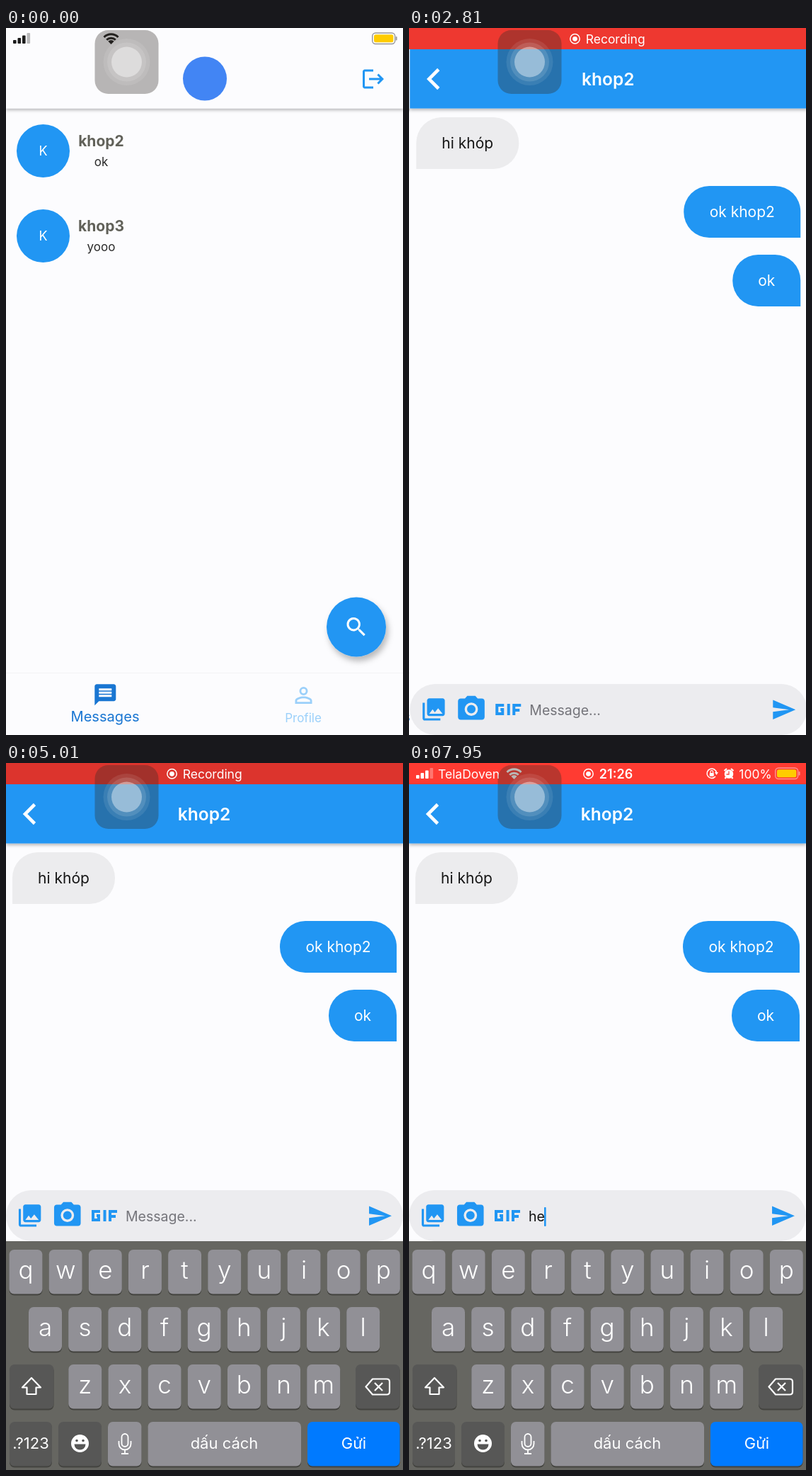
These frames come from a looping animation (561x998 px, 8 s). An HTML page:

```html
<!DOCTYPE html>
<html lang="vi">
<head>
<meta charset="utf-8">
<title>Chat</title>
<style>
html, body { margin: 0; width: 100%; height: 100%; overflow: hidden; background: #fcfcfe; }
svg { display: block; width: 100%; height: 100%; }
text { font-family: Inter, Roboto, sans-serif; white-space: pre; }
</style>
</head>
<body>
<svg id="stage" viewBox="0 0 561 998" xmlns="http://www.w3.org/2000/svg"></svg>
<script>
const LOOP = 8000;
const BLUE = '#2196f3', PAPER = '#fcfcfe';

const text = (str, x, y, size, fill, { weight = 400, anchor = 'middle', id = '' } = {}) =>
  `<text ${id && `id="${id}"`} x="${x}" y="${y + size * 0.36}" font-size="${size}" font-weight="${weight}" text-anchor="${anchor}" fill="${fill}">${str}</text>`;
const rect = (x, y, w, h, r, fill, extra = '') =>
  `<rect x="${x}" y="${y}" width="${w}" height="${h}" rx="${r}" fill="${fill}" ${extra}/>`;
const circle = (x, y, r, fill, extra = '') => `<circle cx="${x}" cy="${y}" r="${r}" fill="${fill}" ${extra}/>`;
const line = (d, color, width, extra = '') =>
  `<path d="${d}" fill="none" stroke="${color}" stroke-width="${width}" ${extra}/>`;
const icon = (d, x, y, scale, fill) =>
  `<path transform="translate(${x} ${y}) scale(${scale})" d="${d}" fill="${fill}" fill-rule="evenodd"/>`;
const group = (id, content, extra = '') => `<g id="${id}" ${extra}>${content}</g>`;

const ICONS = {
  logout: 'M17 7l-1.4 1.4L18.2 11H8v2h10.2l-2.6 2.6L17 17l5-5zM4 5h8V3H4c-1.1 0-2 .9-2 2v14c0 1.1.9 2 2 2h8v-2H4z',
  search: 'M15.5 14h-.8l-.3-.3A6.5 6.5 0 1 0 13.7 14.4l.3.3v.8l5 5 1.5-1.5zm-6 0a4.5 4.5 0 1 1 0-9 4.5 4.5 0 0 1 0 9z',
  message: 'M20 2H4c-1.1 0-2 .9-2 2v18l4-4h14c1.1 0 2-.9 2-2V4c0-1.1-.9-2-2-2zm-2 12H6v-2h12zm0-3H6V9h12zm0-3H6V6h12z',
  person: 'M12 5.9a2.1 2.1 0 1 1 0 4.2 2.1 2.1 0 0 1 0-4.2m0 9c3 0 6.1 1.5 6.1 2.1v1.1H5.9V17c0-.6 3.1-2.1 6.1-2.1M12 4a4 4 0 1 0 0 8 4 4 0 0 0 0-8m0 9c-2.7 0-8 1.3-8 4v3h16v-3c0-2.7-5.3-4-8-4z',
  photos: 'M22 16V4c0-1.1-.9-2-2-2H8c-1.1 0-2 .9-2 2v12c0 1.1.9 2 2 2h12c1.1 0 2-.9 2-2zm-11-4l2 2.7L16 11l4 5H8zM2 6v14c0 1.1.9 2 2 2h14v-2H4V6z',
  camera: 'M9 2L7.2 4H4c-1.1 0-2 .9-2 2v12c0 1.1.9 2 2 2h16c1.1 0 2-.9 2-2V6c0-1.1-.9-2-2-2h-3.2L15 2zm3 15a5 5 0 1 1 0-10 5 5 0 0 1 0 10zm0-1.8a3.2 3.2 0 1 0 0-6.4 3.2 3.2 0 0 0 0 6.4z',
  send: 'M2 21L23 12 2 3v7l15 2-15 2z'
};

function contact(y, name, last) {
  return circle(52.5, y, 37.5, BLUE) + text(name[0].toUpperCase(), 52.5, y, 18, '#fff') +
    text(name, 134.5, y - 14, 21, '#616159', { weight: 700 }) + text(last, 134.5, y + 15.5, 17, '#292929');
}

function appBar(fill) {
  return rect(0, 0, 561, 113.5, 0, fill, 'filter="url(#barShadow)"');
}

function homePage() {
  return rect(0, 0, 561, 998, 0, PAPER) + appBar(PAPER) +
    circle(281, 71.5, 31, '#4285f4') +
    icon(ICONS.logout, 501, 54, 1.5, BLUE) +
    contact(173.5, 'khop2', 'ok') + contact(293.5, 'khop3', 'yooo') +
    circle(495, 845.5, 42, BLUE, 'filter="url(#fabShadow)"') +
    icon(ICONS.search, 477, 827.5, 1.5, '#fff') +
    line('M0 910.5H561', '#f3f3f5', 1) +
    icon(ICONS.message, 122.3, 923.3, 1.5, '#1976d2') + text('Messages', 140, 972, 20.1, '#1976d2') +
    icon(ICONS.person, 402.5, 924, 1.5, '#9bd0fa') + text('Profile', 420, 974, 17, '#9bd0fa');
}

function bubble(y, width, str, mine) {
  const x = mine ? 552 - width : 9, right = x + width, bottom = y + 73;
  const corners = mine
    ? `H${right - 36}A36 36 0 0 1 ${right} ${y + 36}V${bottom}H${x + 36}A36 36 0 0 1 ${x} ${bottom - 36}V${y + 36}`
    : `H${right - 36}A36 36 0 0 1 ${right} ${y + 36}V${bottom - 36}A36 36 0 0 1 ${right - 36} ${bottom}H${x}V${y + 36}`;
  return `<path d="M${x + 36} ${y}${corners}A36 36 0 0 1 ${x + 36} ${y}Z" fill="${mine ? BLUE : '#ececee'}"/>` +
    text(str, x + width / 2, y + 36, 21, mine ? '#fff' : '#151515');
}

function inputBar() {
  return rect(0, 0, 561, 72, 36, '#ececef') +
    icon(ICONS.photos, 14.8, 17, 1.57, BLUE) + icon(ICONS.camera, 64.2, 13, 1.88, BLUE) +
    line('M133 30H123V42H131V36H128M139.5 28V44M147 44V30H157M147 37H155', BLUE, 4) +
    text('Message...', 169, 37, 19.5, '#74747a', { anchor: 'start', id: 'hint' }) +
    text('', 169, 37, 19.5, '#111', { anchor: 'start', id: 'typed' }) +
    rect(168, 24, 2.6, 27, 1, BLUE, 'id="caret"') +
    icon(ICONS.send, 510, 18, 1.52, BLUE);
}

function chatPage() {
  return rect(0, 0, 561, 998, 0, PAPER) + appBar(BLUE) +
    line('M40.5 58.5L27 72L40.5 85.5', '#fff', 4.6) +
    text('khop2', 280, 72, 24.5, '#fff', { weight: 600 }) +
    bubble(126, 145, 'hi khóp', false) + bubble(223, 165, 'ok khop2', true) + bubble(320, 96, 'ok', true) +
    group('input', inputBar());
}

function key(x, y, w, fill, content = '') {
  return rect(x, y + 1.6, w, 63, 7, '#43433f') + rect(x, y, w, 62.5, 7, fill) + content;
}

function keyboard() {
  const light = '#919096', dark = '#575756', label = (s, x) => text(s, x, 960, 22, '#fff');
  const row = (letters, x, y) => [...letters].map((ch, i) => {
    const left = x + i * 56.15;
    return key(left, y, 47, light,
      `<text x="${left + 23.5}" y="${y + 41}" font-size="35" font-weight="300" text-anchor="middle" fill="#fff">${ch}</text>`);
  }).join('');
  return rect(0, 675, 561, 323, 0, '#666661') +
    row('qwertyuiop', 4.5, 687) + row('asdfghjkl', 32, 768) + row('zxcvbnm', 88.3, 849) +
    key(5, 849, 62.5, dark, line('M36 868L23 881.5H29.5V891H42.5V881.5H49Z', '#fff', 2.2, 'stroke-linejoin="round"')) +
    key(494, 849, 62.5, dark, line('M518 869.5H538Q542 869.5 542 873.5V887.5Q542 891.5 538 891.5H518L508.5 880.5ZM521 875L532 886M532 875L521 886', '#fff', 2.2, 'stroke-linejoin="round"')) +
    key(5, 930, 60, dark, label('.?123', 35)) +
    key(74, 930, 61, dark, circle(104.5, 960.5, 12.5, '#fff') + circle(100, 956.5, 1.8, dark) + circle(109, 956.5, 1.8, dark) +
      `<path d="M96.5 961.5H112.5A8 8 0 0 1 96.5 961.5Z" fill="${dark}"/>`) +
    key(144, 930, 47.5, light, rect(163.5, 947, 9, 18, 4.5, 'none', 'stroke="#fff" stroke-width="1.8"') +
      line('M159.5 957V961A8.5 8.5 0 0 0 176.5 961V957M168 969.5V975M163 975H173', '#fff', 1.8)) +
    key(200.5, 930, 216.5, light, label('dấu cách', 308.5)) +
    key(426, 930, 130.5, '#007aff', label('Gửi', 491.5));
}

function statusIcons() {
  const ink = 'currentColor';
  const bars = [5, 8, 11.5, 15].map((h, i) => rect(10 + i * 6.5, 22 - h, 4.6, h, 1, ink, i === 3 ? 'opacity=".3"' : '')).join('');
  const wifi = line('M138.5 13A14 14 0 0 1 158.5 13M142.2 16.7A9 9 0 0 1 154.8 16.7', ink, 3) +
    `<path d="M148.5 23L144.3 18.8A6 6 0 0 1 152.7 18.8Z" fill="${ink}"/>`;
  const battery = rect(517.7, 7, 32, 15.5, 4.5, 'none', `stroke="${ink}" stroke-opacity=".45" stroke-width="1.4"`) +
    rect(520, 9.2, 27.4, 11.1, 2.5, '#ffcc00') + rect(550.8, 12, 1.8, 5.5, 1, ink, 'opacity=".45"');
  return bars + wifi + battery;
}

function statusDetails() {
  const lock = line('M433 19A6.7 6.7 0 1 1 434.5 14', '#fff', 1.5) + '<path d="M432 13H437L434.5 17Z" fill="#fff"/>' +
    rect(424.8, 14, 6, 4.8, 1, '#fff') + line('M426 14V12.5A1.8 1.8 0 0 1 429.6 12.5V14', '#fff', 1.2);
  const alarm = circle(452, 15.5, 6.3, '#fff') + line('M445.5 11L449 8M458.5 11L455 8M448 20L446.5 22M456 20L457.5 22', '#fff', 2.2) +
    line('M452 11.5V16H448.5', '#f4463d', 1.3);
  return text('TelaDoven', 41, 15.5, 17.5, '#fff', { anchor: 'start' }) + lock + alarm +
    text('100%', 489.5, 15.5, 17.5, '#fff');
}

function assistButton() {
  return rect(125.5, 3, 90, 90, 19, 'rgba(50,45,40,.34)') +
    circle(170.5, 48, 33, 'rgba(255,255,255,.09)') + circle(170.5, 48, 27.5, 'rgba(255,255,255,.12)') +
    circle(170.5, 48, 21.5, 'rgba(255,255,255,.4)');
}

document.getElementById('stage').innerHTML =
  `<defs>
    <filter id="barShadow" x="-5%" y="-5%" width="110%" height="125%"><feDropShadow dx="0" dy="2.5" stdDeviation="2" flood-opacity=".27"/></filter>
    <filter id="fabShadow" x="-30%" y="-30%" width="160%" height="160%"><feDropShadow dx="3" dy="6" stdDeviation="4" flood-opacity=".27"/></filter>
  </defs>` +
  group('home', homePage()) + group('chat', chatPage()) + group('keys', keyboard()) +
  rect(0, 0, 561, 30, 0, PAPER, 'id="band"') +
  group('icons', statusIcons()) + group('details', statusDetails()) +
  group('clock', text('21:26', 0, 15.5, 18, '#fff', { weight: 600 })) +
  group('glyph', circle(234.5, 15.3, 6.7, 'none', 'stroke="#fff" stroke-width="1.5"') + circle(234.5, 15.3, 3.4, '#fff')) +
  group('recording', text('Recording', 291.7, 15.5, 17.5, '#fff')) +
  assistButton();

// Steps are [time in ms, value or list of channels].
const RED = [255, 59, 50], DIM = [220, 52, 45];
const tracks = {
  band: [[0, [252, 252, 254]], [150, [252, 252, 254]], [720, [255, 127, 121]], [1300, RED], [2290, DIM],
    [3300, RED], [3760, RED], [4580, DIM], [5610, DIM], [6700, RED]],
  ink: [[0, [28, 28, 28]], [100, [28, 28, 28]], [400, [255, 255, 255]]],
  details: [[100, 0], [500, 1], [1500, 1], [1800, 0], [5680, 0], [5950, 1]],
  icons: [[0, 1], [1500, 1], [1800, 0], [5680, 0], [5950, 1]],
  clock: [[100, 0], [500, 1], [1500, 1], [1750, 0], [5400, 0], [5640, 1]],
  recording: [[1550, 0], [1850, 1], [5450, 1], [5700, 0]],
  glyph: [[1550, 0], [1850, 1]],
  shift: [[5400, 0], [5610, 14], [5700, 19]]
};

function at(track, t) {
  const next = track.findIndex(step => step[0] > t);
  if (next === 0) return track[0][1];
  if (next < 0) return track[track.length - 1][1];
  const [t0, a] = track[next - 1], [t1, b] = track[next], p = (t - t0) / (t1 - t0);
  return Array.isArray(a) ? a.map((v, i) => v + (b[i] - v) * p) : a + (b - a) * p;
}

const easeOut = (t, start, length) => 1 - (1 - Math.min(1, Math.max(0, (t - start) / length))) ** 3;
const PUSH = 2420, FOCUS = 4455;
const TYPING = [[7050, 'h'], [7600, 'he']];
const CARET_X = { '': 167.5, h: 180, he: 191 };

const el = id => document.getElementById(id);
const move = (id, x, y = 0) => el(id).setAttribute('transform', `translate(${x} ${y})`);
const rgb = channels => `rgb(${channels.map(Math.round)})`;

function draw(t) {
  const push = easeOut(t, PUSH, 450);
  move('home', -187 * push);
  move('chat', 561 * (1 - push));
  el('chat').style.visibility = t < PUSH ? 'hidden' : 'visible';

  const focused = t >= FOCUS;
  move('input', 0, focused ? 603 : 926);
  move('keys', 0, 323 * (1 - easeOut(t, FOCUS, 400)));

  const [since, typed] = TYPING.filter(step => step[0] <= t).pop() || [FOCUS, ''];
  el('typed').textContent = typed;
  el('hint').style.opacity = typed ? 0 : 1;
  el('caret').setAttribute('x', CARET_X[typed]);
  el('caret').style.opacity = focused && (t - since) % 1000 < 500 ? 1 : 0;

  el('band').setAttribute('fill', rgb(at(tracks.band, t)));
  el('icons').style.color = rgb(at(tracks.ink, t));
  for (const id of ['details', 'icons', 'clock', 'recording', 'glyph']) el(id).style.opacity = at(tracks[id], t);
  const shift = at(tracks.shift, t);
  move('glyph', shift);
  move('recording', shift);
  move('clock', t < 3000 ? 289.5 : 273.5 + shift);
}

const start = performance.now();
function tick() {
  draw((performance.now() - start) % LOOP);
  requestAnimationFrame(tick);
}
draw(0);
requestAnimationFrame(tick);
</script>
</body>
</html>
```
